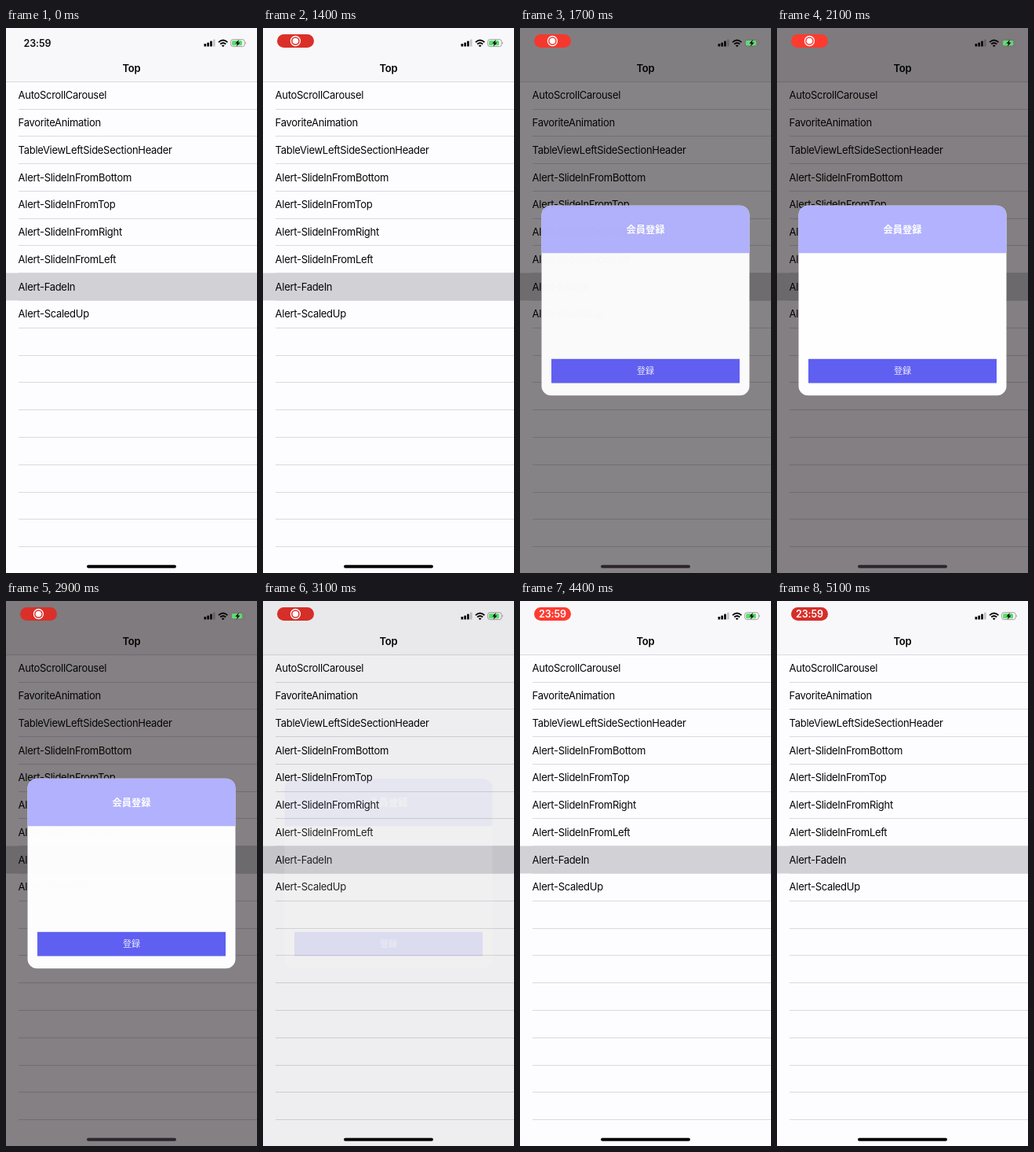
An HTML page for the animation above (5200 ms loop, 320 by 693 pixels).

```html
<!DOCTYPE html>
<html lang="ja">
<head>
<meta charset="utf-8">
<title>Alert fade</title>
<style>
  html, body { margin: 0; width: 100%; height: 100%; overflow: hidden; background: #fdfdff; }
  svg { display: block; width: 100vw; height: 100vh; }
  text { font-family: Inter, "Noto Sans CJK JP", "Noto Sans CJK", sans-serif; }
  .row { font-size: 13px; letter-spacing: -.29px; }
  .title { font-size: 13px; font-weight: 600; letter-spacing: -.2px; }
  .clock { font-size: 12.5px; font-weight: 600; letter-spacing: -.1px; }
  .mid { text-anchor: middle; }
  .jp { font-family: "Noto Sans CJK JP", "Noto Sans CJK", sans-serif; fill: #fff; }
</style>
</head>
<body>
<svg viewBox="0 0 320 693" preserveAspectRatio="none">
  <rect id="page" width="320" height="693"/>
  <rect id="bar" width="320" height="68"/>
  <rect id="picked" y="311.5" width="320" height="35"/>
  <g id="lines" stroke-width="1"></g>
  <g id="rows" fill="#050505"></g>
  <text class="title mid" x="160" y="55.7" fill="#030303">Top</text>

  <g id="status" fill="#080808">
    <rect x="252.5" y="20" width="2.7" height="3.6" rx=".6"/>
    <rect x="256.3" y="18.4" width="2.7" height="5.2" rx=".6"/>
    <rect x="260.1" y="16.4" width="2.7" height="7.2" rx=".6"/>
    <rect x="263.9" y="14.4" width="2.7" height="9.2" rx=".6" opacity=".22"/>
    <g fill="none" stroke="#080808" stroke-width="1.9">
      <path d="M271 18.1Q276.7 12.9 282.4 18.1"/>
      <path d="M273.2 20.5Q276.7 17.3 280.2 20.5"/>
    </g>
    <path d="M274.8 22.2Q276.7 20.7 278.6 22.2L276.7 24.2Z"/>
    <rect x="286.6" y="14.6" width="17.6" height="9" rx="2.7" fill="none" stroke="#777" stroke-width=".9" stroke-opacity=".75"/>
    <rect x="288" y="16" width="13" height="6.2" rx="1.5" fill="#5fdc70"/>
    <path d="M305.2 17.6Q306.8 19.1 305.2 20.6Z" fill="#777"/>
    <path d="M297 14.8L292.3 19.7H295L293.8 23.6L298.6 18.4H295.8Z"/>
  </g>

  <rect id="home" x="103" y="682.8" width="114" height="4" rx="2"/>

  <g id="alert">
    <rect x="27.5" y="225.7" width="265" height="241.5" rx="12" fill="#fefeff"/>
    <path d="M27.5 286.2V237.7A12 12 0 0 1 39.5 225.7H280.5A12 12 0 0 1 292.5 237.7V286.2Z" fill="#b2b2ff"/>
    <text class="jp mid" x="160" y="260.6" font-size="12.3" font-weight="700">会員登録</text>
    <rect x="40" y="420.8" width="240" height="30.7" fill="#5f5ff2"/>
    <text class="jp mid" x="160" y="440.2" font-size="11" fill-opacity=".9">登録</text>
  </g>

  <text id="clock" class="clock mid" x="40" y="23.6" fill="#111">23:59</text>
  <g id="pill">
    <rect id="pillBox" x="18" y="8" width="47" height="17" rx="8.5"/>
    <g id="rec">
      <circle cx="41.4" cy="16.5" r="6" fill="none" stroke="#fff" stroke-width="1.3"/>
      <circle cx="41.4" cy="16.5" r="3.8" fill="#fff"/>
    </g>
    <text id="pillClock" class="clock mid" x="41.5" y="21" fill="#fff">23:59</text>
  </g>
</svg>
<script>
const LOOP = 5200, STEP = 100;
const ROW_H = 34.78, TOP = 68.3;
const NAMES = ["AutoScrollCarousel", "FavoriteAnimation", "TableViewLeftSideSectionHeader",
  "Alert-SlideInFromBottom", "Alert-SlideInFromTop", "Alert-SlideInFromRight",
  "Alert-SlideInFromLeft", "Alert-FadeIn", "Alert-ScaledUp"];

// Colours when clear and when fully dimmed
const TONES = {
  page: [[253, 253, 255], [131, 127, 130]],
  bar: [[248, 248, 250], [126, 122, 125]],
  picked: [[210, 209, 214], [107, 105, 108]],
  lines: [[218, 217, 222], [110, 107, 118]],
  home: [[4, 4, 4], [44, 39, 46]]
};
const PILL_DARK = [214, 46, 40], PILL_LIT = [255, 59, 48];

const $ = id => document.getElementById(id);
const clamp = v => Math.max(0, Math.min(1, v));
const ramp = (t, from, len) => clamp((t - from) / len);
const ease = p => p * p * (3 - 2 * p);
const mix = (a, b, p) => `rgb(${a.map((v, i) => Math.round(v + (b[i] - v) * p))})`;
const show = (id, v) => $(id).setAttribute("opacity", v);

function add(parent, tag, attrs, text = "") {
  const el = document.createElementNS("http://www.w3.org/2000/svg", tag);
  for (const k in attrs) el.setAttribute(k, attrs[k]);
  el.textContent = text;
  $(parent).appendChild(el);
}

for (let i = 0; i < 18; i++) {
  const y = Math.floor(TOP + i * ROW_H) + .5;
  add("lines", "line", { x1: i ? 16 : 0, x2: 320, y1: y, y2: y });
}
NAMES.forEach((name, i) =>
  add("rows", "text", { class: "row", x: 15.6, y: 90.2 + i * ROW_H }, name));

function draw(t) {
  const dim = ease(ramp(t, 1430, 300)) - ease(ramp(t, 2885, 275));
  for (const id in TONES)
    $(id).setAttribute(id === "lines" ? "stroke" : "fill", mix(...TONES[id], dim));
  show("alert", dim);

  const pill = ramp(t, 400, 300);
  const clock = ramp(t, 3250, 250);
  const glow = clamp(.65 - .75 * Math.cos((t - 1150) / 1000 * Math.PI));
  show("clock", 1 - pill);
  show("pill", pill);
  show("rec", 1 - clock);
  show("pillClock", clock);
  $("pillBox").setAttribute("fill", mix(PILL_DARK, PILL_LIT, glow));
}

const start = performance.now();
function tick() {
  const t = (performance.now() - start) % LOOP;
  draw(Math.floor(t / STEP) * STEP);
  requestAnimationFrame(tick);
}
draw(0);
requestAnimationFrame(tick);
</script>
</body>
</html>
```
